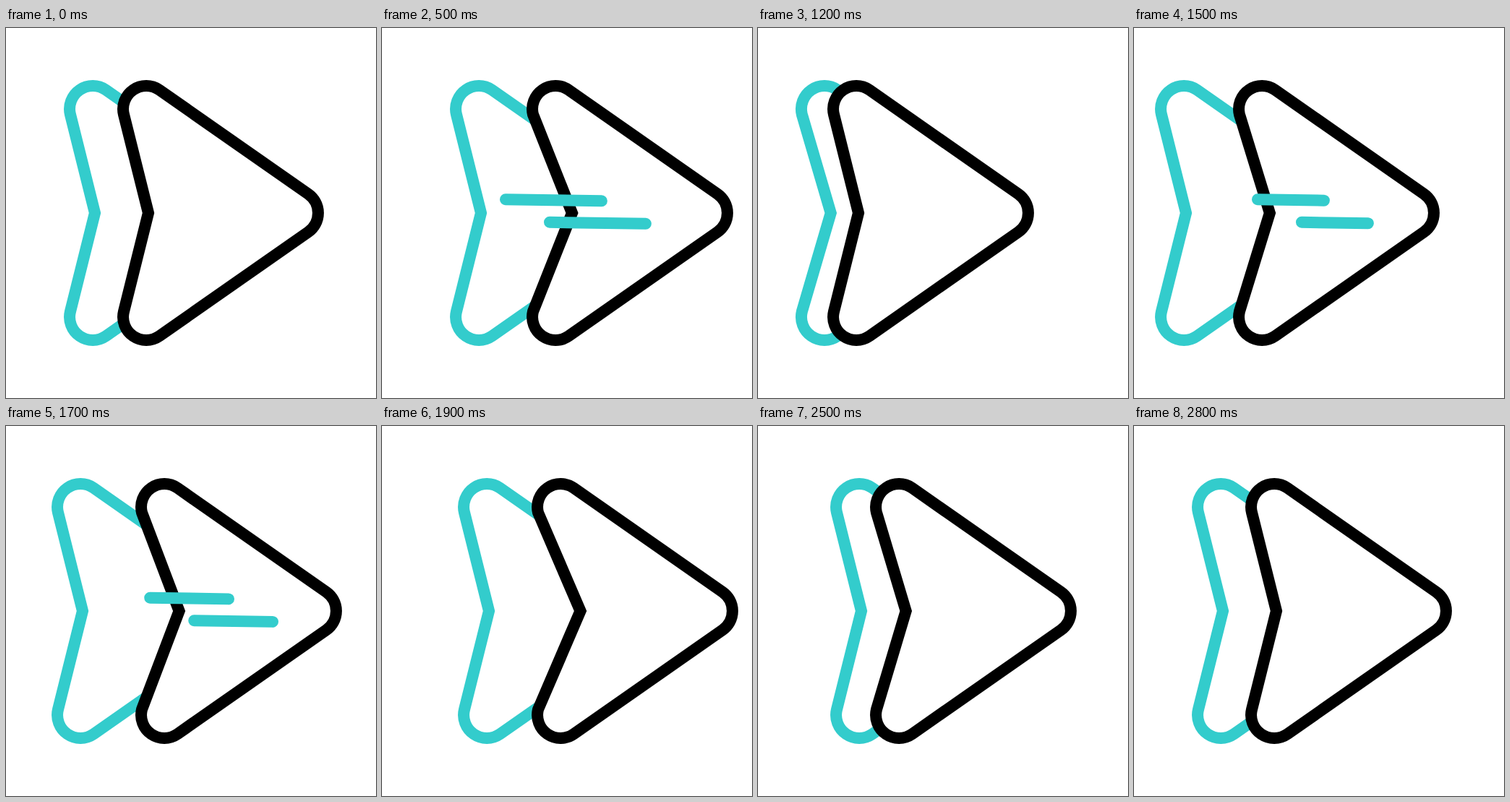
An HTML page that plays this animation: 512x512 px, repeating every 3000 ms.

```html
<!DOCTYPE html>
<html lang="en">
<head>
<meta charset="utf-8">
<title>Send arrow</title>
<style>
  html, body { margin: 0; width: 100%; height: 100%; overflow: hidden; background: #fff; }
  svg { display: block; width: 100vw; height: 100vh; }
  path { fill: #fff; stroke-width: 16; stroke-miterlimit: 10; }
  line { stroke: #33cccc; stroke-width: 16; stroke-linecap: round; }
</style>
</head>
<body>
<svg viewBox="0 0 512 512">
  <path id="back" stroke="#33cccc"/>
  <path id="front" stroke="#000"/>
  <line id="upper"/>
  <line id="lower"/>
</svg>
<script>
const LOOP = 3000, STEP = 100, LAG = 200;
const $ = id => document.getElementById(id);

// Horizontal travel of the arrow: [ms, px]
const TRAVEL = [
  [100, 0], [300, 14], [500, 46], [600, 56], [700, 50], [900, -1],
  [1100, -52], [1200, -58], [1300, -51], [1500, -17], [1700, 25],
  [1900, 53], [2000, 55], [2100, 48], [2300, 20], [2500, 1], [2600, 0]
];

// Smooth 0..1 ramp between two times
function ramp(t, from, to) {
  const p = Math.min(1, Math.max(0, (t - from) / (to - from)));
  return (1 - Math.cos(Math.PI * p)) / 2;
}

const bump = (t, from, peak, to) => ramp(t, from, peak) - ramp(t, peak, to);

function slope(i) {
  const a = TRAVEL[i - 1], b = TRAVEL[i + 1];
  return a && b ? (b[1] - a[1]) / (b[0] - a[0]) : 0;
}

// Cubic Hermite curve through the travel points
function travel(t) {
  const last = TRAVEL.length - 1;
  if (t <= TRAVEL[0][0] || t >= TRAVEL[last][0]) return 0;
  const i = TRAVEL.findIndex(k => k[0] > t) - 1;
  const [t0, x0] = TRAVEL[i], [t1, x1] = TRAVEL[i + 1];
  const d = t1 - t0, u = (t - t0) / d, v = 1 - u;
  return x0 * (1 + 2 * u) * v * v + x1 * u * u * (3 - 2 * u)
    + d * u * v * (slope(i) * v - slope(i + 1) * u);
}

// cx: centre of the left corners, notch: offset of the inner point
function arrow(cx, notch) {
  const pt = (x, y) => `${(cx + x).toFixed(2)} ${y}`;
  const arc = (x, y) => `A32 32 0 0 1 ${pt(x, y)}`;
  return `M${pt(notch, 256)}L${pt(-31, 119.8)}${arc(18.3, 85.8)}`
    + `L${pt(224.3, 229.8)}${arc(224.3, 282.2)}`
    + `L${pt(18.3, 426.2)}${arc(-31, 392.2)}Z`;
}

function streak(el, x, y, a, b) {
  const tilt = 2 / 132;
  el.setAttribute('x1', x + a);
  el.setAttribute('y1', y + a * tilt);
  el.setAttribute('x2', x + b);
  el.setAttribute('y2', y + b * tilt);
  el.style.display = b - a > 0.01 ? '' : 'none';
}

function draw(t) {
  const bend = s => 40 * bump(s, 300, 700, 1100);
  const second = 25.5 * bump(t, 1200, 2000, 2760);
  $('back').setAttribute('d', arrow(120 + travel(t - LAG), 3 + bend(t - LAG)));
  $('front').setAttribute('d', arrow(194 + travel(t), 3 + bend(t) + second));

  const start = t < 1200 ? 100 : 1225;
  const head = 137 * ramp(t, start, start + 450);
  const tail = 137 * ramp(t, start + 400, start + 650);
  streak($('upper'), 171, 237.3, tail, head);
  streak($('lower'), 232, 268.8, tail, head);
}

const begin = performance.now();
function tick() {
  const t = (performance.now() - begin) % LOOP;
  draw(Math.floor(t / STEP) * STEP);
  requestAnimationFrame(tick);
}
tick();
</script>
</body>
</html>
```
